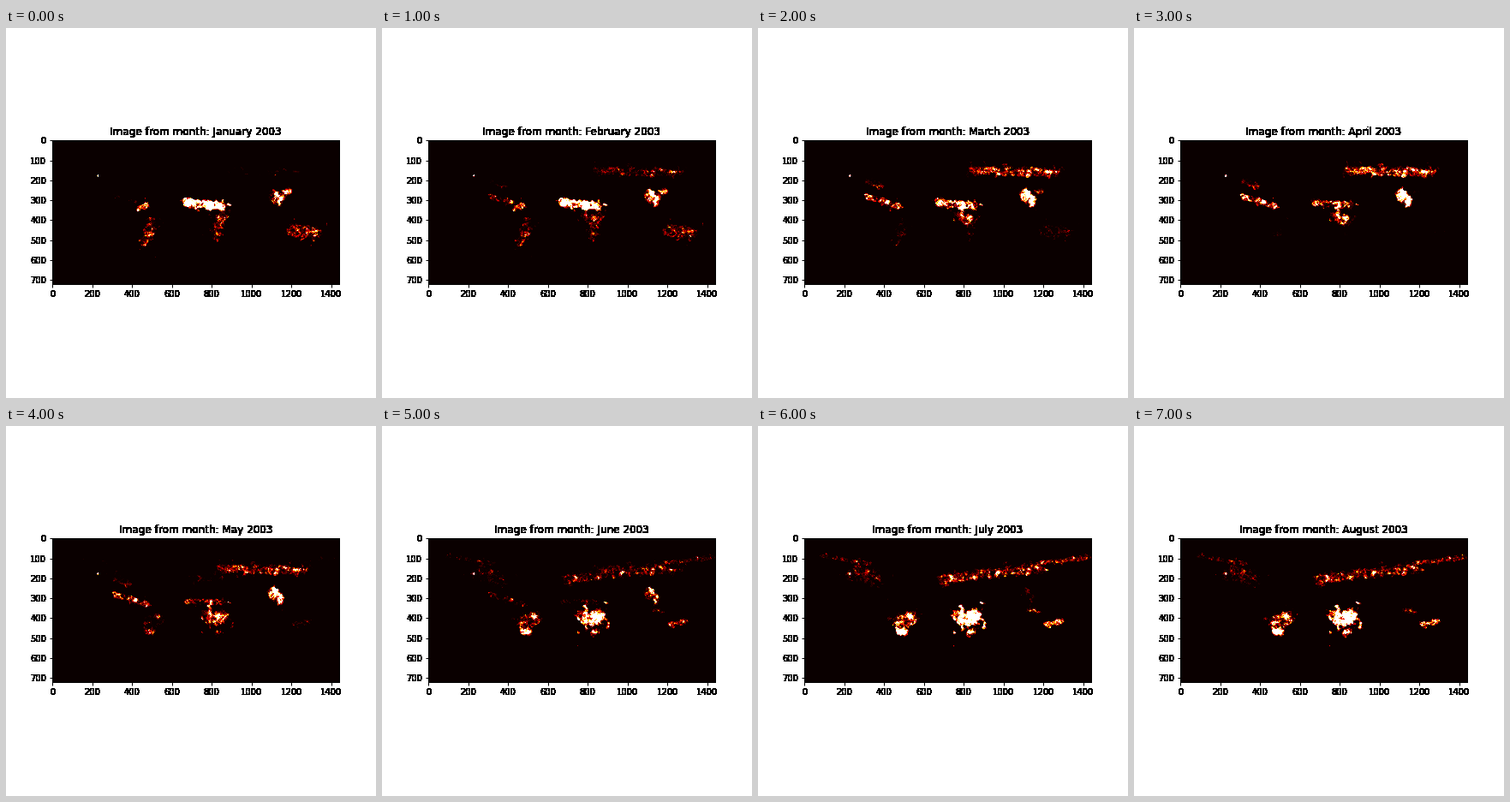
A matplotlib script for the animation above (8 s loop, 432 px wide and 432 px high).

```python
import numpy as np
import matplotlib.pyplot as plt
from matplotlib.animation import FuncAnimation

MONTHS = ["January", "February", "March", "April", "May", "June", "July", "August"]
W, H = 1440, 720
COLS, ROWS = 335, 168

# Fire belts by peak month: start point, end point, half width, strength
SEASONS = {
    0.1: {
        "Sahel": ((672, 312), (852, 332), 17, 5.0),
        "Venezuela": ((440, 340), (470, 325), 13, 0.6),
        "Chaco": ((500, 415), (458, 508), 24, 0.2),
        "Southern Africa": ((860, 365), (825, 475), 28, 0.14),
        "South China": ((1125, 300), (1185, 255), 18, 0.4),
        "Australia": ((1210, 455), (1310, 465), 32, 0.18),
    },
    2.8: {
        "Gulf coast": ((320, 205), (380, 230), 13, 0.12),
        "Caribbean rim": ((310, 280), (475, 330), 13, 0.5),
        "Guinea": ((668, 315), (860, 322), 13, 0.45),
        "Congo north": ((795, 380), (815, 395), 24, 0.9),
        "Steppe": ((840, 150), (1265, 158), 20, 0.35),
        "Indochina": ((1105, 268), (1140, 300), 22, 1.2),
    },
    6.4: {
        "Congo": ((808, 398), (848, 396), 36, 4.5),
        "Mozambique": ((828, 475), (845, 458), 15, 0.9),
        "Madagascar": ((899, 446), (907, 428), 9, 1.2),
        "Cerrado": ((478, 425), (535, 398), 28, 0.6),
        "Pantanal": ((478, 465), (495, 463), 18, 2.0),
        "Rockies": ((260, 165), (345, 190), 38, 0.09),
        "Alaska": ((80, 88), (330, 130), 11, 0.09),
        "Kazakhstan": ((700, 207), (1180, 143), 24, 0.2),
        "Yakutia": ((1180, 125), (1425, 96), 13, 0.18),
        "Java": ((1130, 360), (1165, 370), 14, 0.2),
        "Arnhem": ((1215, 430), (1290, 414), 13, 0.45),
    },
}
SEASON_WIDTH = 1.5


def blur(a, times):
    for _ in range(times):
        for axis in (0, 1):
            a = a / 2 + (np.roll(a, 1, axis) + np.roll(a, -1, axis)) / 4
    return a


def noise(rng, times):
    a = blur(rng.standard_normal((ROWS, COLS)), times)
    return a / a.std()


x, y = np.meshgrid((np.arange(COLS) + 0.5) * W / COLS,
                   (np.arange(ROWS) + 0.5) * H / ROWS)
rng = np.random.default_rng(2003)
rough = noise(rng, 4)
texture = 0.55 * noise(rng, 1) + 0.65 * noise(rng, 5)


def belt(start, end, half_width, strength):
    """Soft ragged capsule around the line from start to end."""
    (x0, y0), (x1, y1) = start, end
    dx, dy = x1 - x0, y1 - y0
    t = np.clip(((x - x0) * dx + (y - y0) * dy) / (dx**2 + dy**2), 0, 1)
    dist = np.hypot(x - x0 - t * dx, y - y0 - t * dy) / half_width
    return strength * np.exp(-(dist * (1 + 0.2 * rough)) ** 4)


layers = {peak: sum(belt(*b) for b in belts.values())
          for peak, belts in SEASONS.items()}


def burned(month):
    """Fire intensity of one month, 0 to 1."""
    total = sum(layer * np.exp(-((month - peak) / SEASON_WIDTH) ** 2)
                for peak, layer in layers.items())
    grain = noise(np.random.default_rng(month), 0)
    spread = np.exp(1.15 * texture + 0.45 * grain - 0.2)
    return np.clip(total * spread - 0.03, 0, 1)


def harden(img, dpi):
    """Turn soft glyph edges into solid pixels."""
    img = img.copy()
    img[..., 3] = img[..., 3] > 0
    return img, 0, 0


plt.rcParams.update({"font.family": "DejaVu Sans", "font.size": 10,
                     "axes.linewidth": 1, "xtick.major.width": 1,
                     "ytick.major.width": 1})
fig, ax = plt.subplots(figsize=(6, 6), dpi=72)
fig.subplots_adjust(left=0.125, right=0.9, bottom=0.125, top=0.88)
maps = [burned(m) for m in range(len(MONTHS))]
image = ax.imshow(maps[0], cmap="hot", vmin=0, vmax=1, interpolation="nearest",
                  extent=(-0.5, W - 0.5, H - 0.5, -0.5))
ax.set_xticks(range(0, W, 200))
ax.set_yticks(range(0, H, 100))
title = ax.set_title("")
for text in [title, *ax.get_xticklabels(), *ax.get_yticklabels()]:
    text.set_agg_filter(harden)


def update(i):
    image.set_data(maps[i])
    title.set_text(f"Image from month: {MONTHS[i]} 2003")
    return image, title


anim = FuncAnimation(fig, update, frames=len(MONTHS), interval=1000,
                     repeat=True, repeat_delay=0, blit=False)
plt.show()
```
